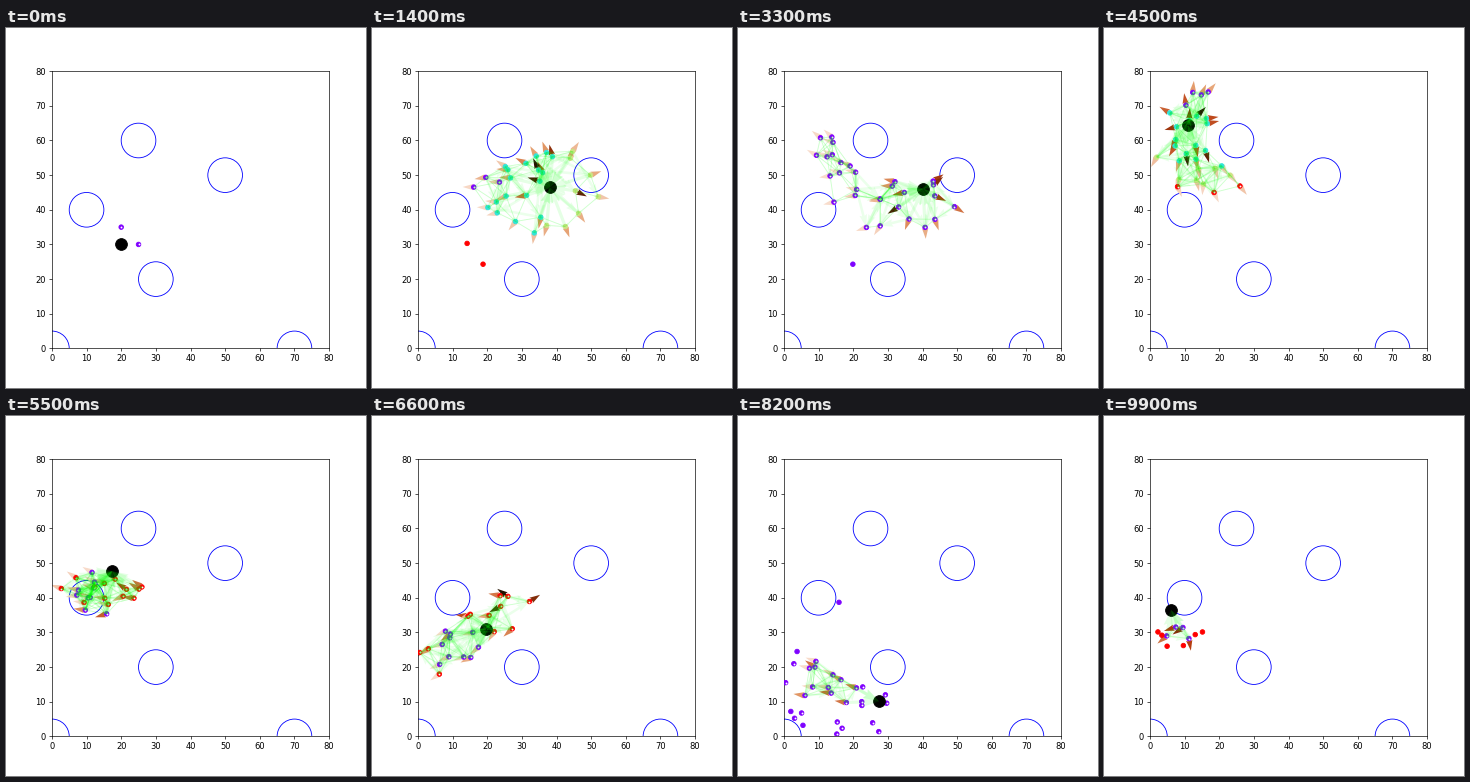
A matplotlib script that plays this animation: 360 px wide and 360 px high, repeating every 10 s.

```python
import matplotlib.pyplot as plt
import numpy as np
from matplotlib import colormaps
from matplotlib.animation import FuncAnimation
from matplotlib.colors import LinearSegmentedColormap

FRAMES, STEP = 100, 100
OBSTACLES = [(10, 40), (25, 60), (50, 50), (30, 20), (0, 0), (70, 0)]
PAUSES = {5, 8, 15, 18, 27, 28, 48, 65, 78, 98}
HEAT = LinearSegmentedColormap.from_list(
    "heat", ["#f8dccb", "#e39a68", "#b83c10", "#241200"])

# Agent states double as positions on the rainbow map
IDLE, NEAR, MID, FAR, EDGE, LOST = -1, 0, 0.35, 0.65, 1, 2

# (ms, x, y) way points of the leader
ROUTE = np.array([
    (0, 20, 30), (400, 31, 40), (1400, 38.2, 46.5), (2200, 34, 48),
    (3300, 40.2, 46), (3900, 25, 48), (4500, 11, 64.4), (5900, 20, 41),
    (6600, 19.7, 31), (7700, 27.5, 10.1), (8200, 27.5, 10.1),
    (9000, 17, 15), (9900, 6.1, 36.5)])


class Formation:
    """Agents scattered around a spine of (x, y, spread) points."""

    def __init__(self, begin, end, count, spine, origin=(0, 0),
                 bands=((99, NEAR),), lost=(), hub=None, power=1.5):
        self.begin, self.end, self.power, self.hub = begin, end, power, hub
        self.lost = np.array(lost, float).reshape(-1, 2)
        u = np.linspace(0, 1, count)
        knots = np.linspace(0, 1, len(spine))
        x, y, spread = (np.interp(u, knots, col) for col in zip(*spine))
        i = np.arange(count)
        radius = spread * np.sqrt((0.5 + i * 0.618) % 1)
        self.pos = np.column_stack([x + radius * np.cos(2.4 * i),
                                    y + radius * np.sin(2.4 * i)])
        self.pos = np.clip(self.pos, 0.5, 79)
        dist = np.linalg.norm(self.pos - origin, axis=1)
        limits, states = zip(*bands)
        self.state = np.array(states)[np.searchsorted(limits, dist)]


FORMATIONS = [
    Formation(0, 0, 2, [(20, 35, 0), (25, 30, 0)], bands=[(99, IDLE)]),
    Formation(0, 1400, 29, [(20, 48, 5), (35, 48, 17), (42, 49, 16)],
              (17, 49), [(7, NEAR), (24, MID), (99, FAR)],
              [(14.2, 30.3), (18.8, 24.3)], power=4),
    Formation(1800, 2600, 29, [(11, 61, 4), (15, 53, 4), (23, 43, 9),
                               (36, 43, 11), (46, 44, 8)],
              lost=[(19.9, 24.3)]),
    Formation(3700, 4500, 28, [(14, 74, 4), (10, 63, 10), (9, 53, 8),
                               (24, 48, 5)],
              (15, 77), [(10, NEAR), (25, MID), (30, FAR), (99, EDGE)]),
    Formation(4800, 6400, 23, [(4, 23, 7), (13, 30, 9), (28, 39, 8)],
              (11, 27), [(8, NEAR), (99, EDGE)], hub=(31, 38.3)),
    Formation(6600, 7600, 25, [(4, 20, 7), (13, 11, 12), (27, 8, 8)],
              (13, 16), [(9.5, NEAR), (99, IDLE)],
              [(15.9, 38.7), (3.8, 24.5), (2, 7.2), (5.5, 3.2)]),
    Formation(8300, 9900, 10, [(2, 29, 4), (8, 30, 4), (14, 29, 4)],
              (8, 30), [(4, NEAR), (99, LOST)], hub=(11, 32.5), power=1.2),
]


def swarm(ms):
    """Positions, states and hub of the swarm at a given time."""
    i = max([n for n, f in enumerate(FORMATIONS) if ms > f.begin], default=0)
    goal = FORMATIONS[i]
    prev = FORMATIONS[max(i - 1, 0)]
    u = min(1, (ms - goal.begin) / (goal.end - goal.begin)) if i else 1
    u = 1 - (1 - u) ** goal.power
    n = len(goal.pos)
    parent = np.arange(n) * len(prev.pos) // n
    pos = prev.pos[parent] * (1 - u) + goal.pos * u
    now = goal if u > 0.4 else prev
    state = goal.state if now is goal else prev.state[parent]
    pos = np.vstack([pos, now.lost])
    return pos, np.append(state, [LOST] * len(now.lost)), goal.hub


fig = plt.figure(figsize=(6, 6), dpi=60)
ax = fig.add_subplot()
ax.set(xlim=(0, 80), ylim=(0, 80), aspect="equal")
for center in OBSTACLES:
    ax.add_patch(plt.Circle(center, 5, fill=False, ec="blue"))

drawn = []


def links(tail, tip, width, alpha):
    if len(tail):
        drawn.append(ax.quiver(*tail.T, *(tip - tail).T, angles="xy",
                               scale_units="xy", scale=1, units="dots",
                               width=width, color="lime", alpha=alpha,
                               lw=0, zorder=5))


def draw_links(pos, leader):
    gap = np.linalg.norm(pos[:, None] - pos[None], axis=2)
    src, dst = np.nonzero((gap < 8.5) & (gap > 0.5))
    links(pos[src], pos[dst], 0.9, 0.1)
    reach = np.linalg.norm(pos - leader, axis=1)
    close = pos[(reach < 14) & (reach > 0.5)]
    links(close, np.tile(leader, (len(close), 1)), 3.2, 0.1)
    core = pos[reach < 22]
    for hop in (1, 2):
        tail, tip = core[:-hop], core[hop:]
        near = np.linalg.norm(tip - tail, axis=1) < 16
        links(tail[near], tip[near], 2.6, 0.08)


def draw_headings(pos, hub, rng):
    away = pos - hub
    dist = np.linalg.norm(away, axis=1)
    angle = np.arctan2(away[:, 1], away[:, 0]) + rng.normal(0, 0.2, len(pos))
    speed = 0.8 * np.exp(-(dist / 10) ** 2) + 0.6 * rng.random(len(pos)) ** 5
    speed = np.clip(speed, 0, 1)
    size = 11 + 2 * speed
    drawn.append(ax.quiver(*pos.T, size * np.cos(angle), size * np.sin(angle),
                           color=HEAT(speed), scale_units="dots", scale=1,
                           units="dots", width=2.1, zorder=2.5))


def update(k):
    while drawn:
        drawn.pop().remove()
    while k in PAUSES:
        k -= 1
    ms = k * STEP
    rng = np.random.default_rng(k + 7)
    leader = np.array([np.interp(ms, ROUTE[:, 0], ROUTE[:, c])
                       for c in (1, 2)])
    pos, state, hub = swarm(ms)

    colors = colormaps["rainbow"](np.clip(state, 0, 1))
    drawn.append(ax.scatter(*pos.T, c=colors, s=30, zorder=3))
    dots = pos[np.isin(state, (IDLE, NEAR, EDGE))]
    drawn.append(ax.scatter(*dots.T, s=5, c="white", lw=0, zorder=3.2))
    active = pos[(state >= NEAR) & (state <= EDGE)]
    if len(active):
        draw_headings(active, leader if hub is None else np.array(hub), rng)
        draw_links(active, leader)
    drawn.append(ax.scatter(*leader, s=200, c="black", zorder=4))
    return drawn


anim = FuncAnimation(fig, update, frames=FRAMES, interval=STEP,
                     init_func=lambda: update(0), repeat=True,
                     repeat_delay=0, blit=False)
plt.show()
```
